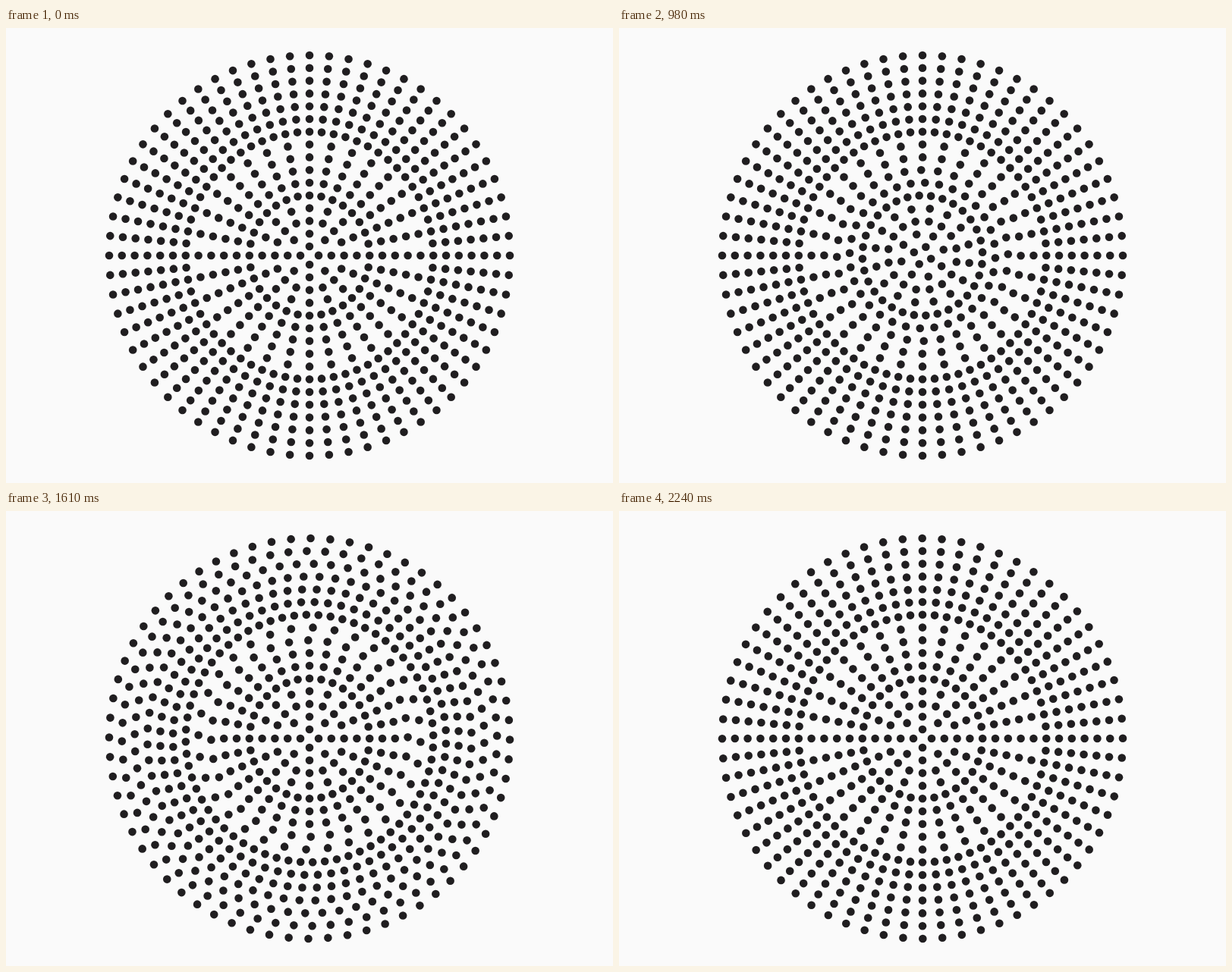
An HTML page with a canvas for the animation above (2.27 s loop, 800 px wide and 600 px high).

```html
<!DOCTYPE html>
<html lang="en">
<head>
<meta charset="utf-8">
<title>Turning rings</title>
<style>
  html, body { margin: 0; width: 100%; height: 100%; overflow: hidden; background: #fafafa; }
  canvas { display: block; width: 800px; height: 600px; }
</style>
</head>
<body>
<canvas width="800" height="600"></canvas>
<script>
const ctx = document.querySelector('canvas').getContext('2d');
const TAU = Math.PI * 2;
const LOOP = 2270, HOLD = 500, STEP = 30, STEPS = 60;
const SHUTTER = 0.3;               // mean offset of the exposure, in steps
const STAGGER = 0.04, TURN = 0.4;  // as shares of the loop
const RINGS = 16, DOT = 5.3, MIN_GAP = 15;

const rings = Array.from({ length: RINGS }, (_, i) => {
  const r = 12 + i * 16.8;
  const count = 2 ** Math.floor(Math.log2(TAU * r / MIN_GAP));
  return { r, count, gap: TAU / count, dir: i % 2 ? 1 : -1, start: i * STAGGER };
});

const clamp = x => Math.min(1, Math.max(0, x));
const half = x => 0.5 * (2 * x) ** 1.3;
const ease = x => x < 0.5 ? half(x) : 1 - half(1 - x);

function draw(ms) {
  const step = ms < HOLD ? 0 : Math.floor((ms - HOLD) / STEP) + 1;
  const u = (step + SHUTTER) / STEPS;

  ctx.fillStyle = '#fafafa';
  ctx.fillRect(0, 0, 800, 600);
  ctx.fillStyle = '#201e20';
  for (const { r, count, gap, dir, start } of rings) {
    // Each ring turns by one gap; neighbours turn opposite ways.
    const turn = dir * gap * ease(clamp((u - start) / TURN));
    for (let j = 0; j < count; j++) {
      const a = j * gap + turn;
      ctx.beginPath();
      ctx.arc(400 + r * Math.cos(a), 300 + r * Math.sin(a), DOT, 0, TAU);
      ctx.fill();
    }
  }
}

const begin = performance.now();
function tick() {
  draw((performance.now() - begin) % LOOP);
  requestAnimationFrame(tick);
}
tick();
</script>
</body>
</html>
```
